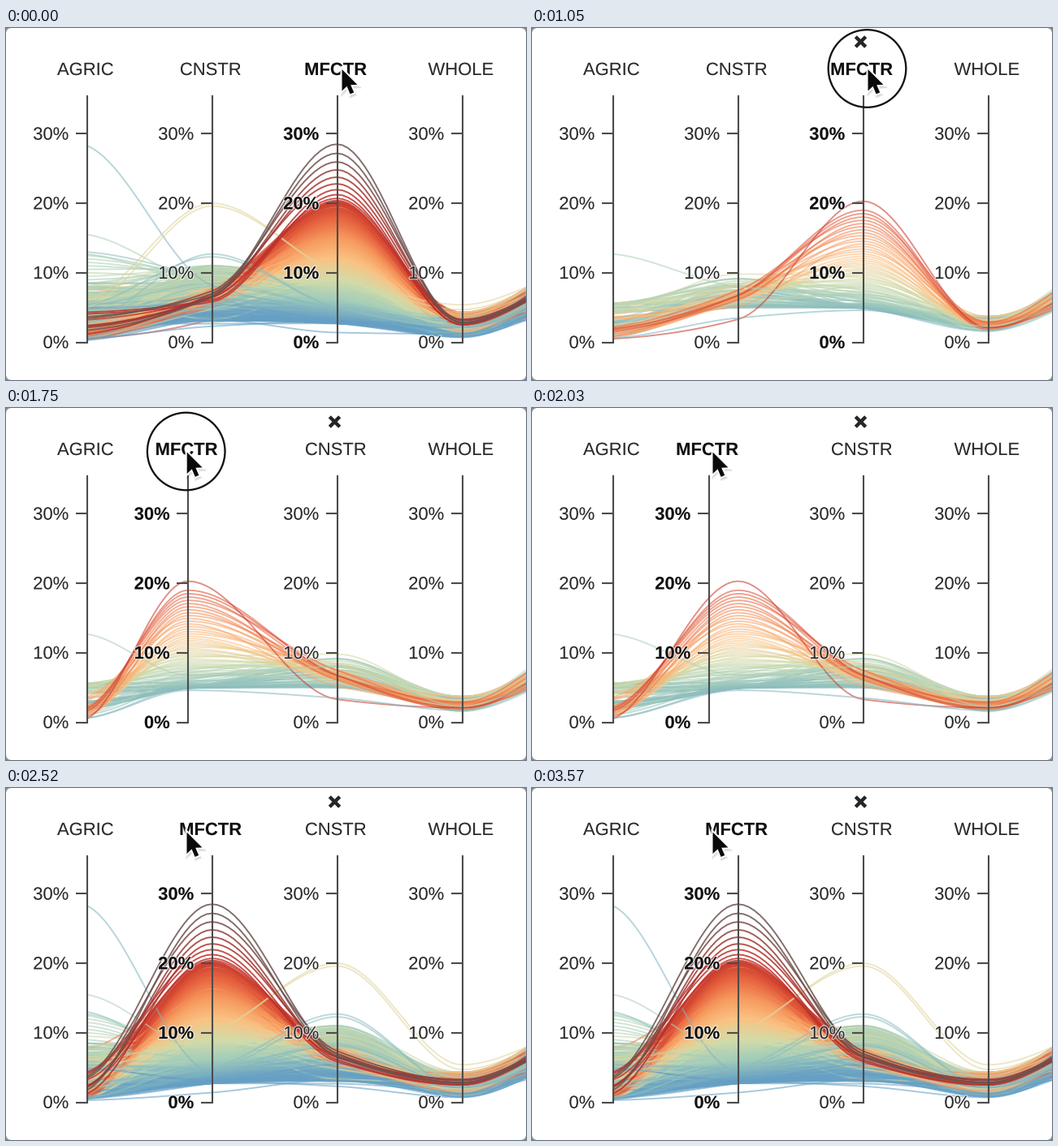
Animation of 640 by 434 pixels, one loop 3640 ms. Source, as a matplotlib script:

```python
import numpy as np
import matplotlib.pyplot as plt
from matplotlib.animation import FuncAnimation
from matplotlib.collections import LineCollection
from matplotlib.colors import LinearSegmentedColormap
from matplotlib.patches import Circle, FancyBboxPatch, Polygon
from matplotlib.patheffects import withStroke

W, H, DPI = 640, 434, 100
PX = 72 / DPI
FRAMES, STEP = 52, 70
SLOTS = 99.5 + 154 * np.arange(5)   # the last axis lies off stage
ZERO, UNIT = 387.5, 8.57            # y of 0 %, pixels per percent
HOVER, PRESS, DRAG, DROP = 3, 14, 15, 29

plt.rcParams["font.family"] = "Liberation Sans"
rng = np.random.default_rng(12)

# evenly spaced from 3 % to 27 %
CMAP = LinearSegmentedColormap.from_list("heat", [
    "#659fc5", "#a2cdbb", "#d3dca9", "#fac384", "#f79c60",
    "#e7633f", "#c23029", "#a03530", "#6b5450"])


def smooth(k, start, end):
    u = np.clip((k - start) / (end - start), 0, 1)
    return u * u * (3 - 2 * u)


def cubic(u):
    u = np.clip(u, 0, 1)
    return 4 * u ** 3 if u < 0.5 else 1 - (2 - 2 * u) ** 3 / 2


# ---- data: columns are AGRIC, CNSTR, MFCTR, WHOLE and the axis off stage
def rows(*cols):
    return np.column_stack(np.broadcast_arrays(*map(np.atleast_1d, cols)))


def sample(mf, ag_max, cn_span, wh_span):
    """Rows that suit the given MFCTR values: green ones spread the widest."""
    n = len(mf)
    green = np.exp(-((mf - 7.5) / 2.8) ** 2)
    blue = np.clip((6 - mf) / 3, 0, 1)
    ag = (0.3 + (1.8 + 6.5 * green) * rng.beta(1.3, 1.6, n)
          + rng.exponential(0.9, n))
    cn = 6.5 + 1.2 * green - 2.2 * blue + (0.7 + 1.1 * green) * rng.normal(0, 1, n)
    wh = 2.8 - 0.9 * blue + rng.normal(0, 0.6, n)
    nx = 9.8 - 1.8 * blue + rng.normal(0, 1.3, n)
    return rows(np.clip(ag, 0.2, ag_max), np.clip(cn, *cn_span), mf,
                np.clip(wh, *wh_span), nx)


few = np.vstack([
    sample(4.9 + 14.1 * np.linspace(0, 1, 85) ** 3, 5.6, (5, 9.8), (1.6, 3.7)),
    rows(0.5, 3.3, 20.3, 2.1, 9.5),
    rows(12.7, 8.0, 6.8, 2.3, 9.0),
    rows(0.6, 3.5, 4.6, 1.7, 8.0)])
fan = rows(np.linspace(8.5, 13, 10), rng.uniform(8.5, 10.8, 10),
           rng.uniform(5, 8.5, 10), 2.3, 9)
bulk = sample(2.7 + 17.5 * rng.random(900) ** 1.4, 8.5, (2.6, 11), (0.8, 4.3))
extra = np.vstack([
    rows([15.5, 28.3], 8.2, [7, 4.5], 2.4, 9),
    rows([6, 5], [20, 19.6], 10, [5.4, 4.7], 11),
    rows([3, 5.4], [12.7, 12.3], 5, 2.2, 8.5),
    rows([0.3, 0.6], [3.2, 2.3], [1.4, 3], [1.2, 0.7], 7),
    rows(rng.uniform(0.6, 4.5, 10), rng.uniform(5.8, 7.6, 10),
         20.4 + 8.1 * np.linspace(0, 1, 10) ** 1.5,
         rng.uniform(2.5, 3.4, 10), rng.uniform(9, 11.5, 10))])

DATA = np.vstack([few, fan, bulk, extra])
COLORS = CMAP(np.clip((DATA[:, 2] - 3) / 24, 0, 1))
COLORS[:, 3] = np.where(DATA[:, 2] > 20.3, 0.85, 0.58)
RANK = np.r_[np.zeros(len(few)), np.full(len(fan), 0.3),
             rng.uniform(0.05, 1, len(bulk)), np.full(len(extra), 0.3)]

T = np.linspace(0, 1, 24)
H00, H10 = 2 * T**3 - 3 * T**2 + 1, T**3 - 2 * T**2 + T
H01, H11 = 3 * T**2 - 2 * T**3, T**3 - T**2


def curves(xs, vals):
    """Smooth monotone curves through every row of vals at the places xs."""
    y = ZERO - UNIT * vals
    dx = np.diff(xs)
    s = np.diff(y) / dx
    a, b = s[:, :-1], s[:, 1:]
    same = a * b > 0
    mid = np.where(same, 2 * a * b / np.where(same, a + b, 1), 0)
    m = np.c_[0.35 * s[:, 0], mid, 0.5 * s[:, -1]]
    parts = []
    for i, d in enumerate(dx):
        parts.append(np.outer(y[:, i], H00) + np.outer(y[:, i + 1], H01)
                     + d * (np.outer(m[:, i], H10) + np.outer(m[:, i + 1], H11)))
    py = np.hstack(parts)
    px = np.concatenate([x + d * T for x, d in zip(xs, dx)])
    return np.stack([np.broadcast_to(px, py.shape), py], axis=-1)


# ---- stage
fig = plt.figure(figsize=(W / DPI, H / DPI), dpi=DPI, facecolor="#8c8c8c")
ax = fig.add_axes([0, 0, 1, 1])
ax.set_xlim(0, W)
ax.set_ylim(H, 0)
ax.axis("off")
ax.add_patch(FancyBboxPatch((0, 0), W, H, fc="white", ec="none", zorder=0,
                            boxstyle="round,pad=0,rounding_size=7"))

lines = LineCollection([], linewidths=1.9 * PX, zorder=1)
ax.add_collection(lines)


class Axis:
    def __init__(self, name, x, bold=False):
        style = dict(fontsize=22 * PX, weight="bold" if bold else "normal",
                     color="#111111" if bold else "#2b2b2b", zorder=4,
                     path_effects=[withStroke(linewidth=2.4 * PX,
                                              foreground=(1, 1, 1, 0.65))])
        self.title = ax.text(0, 58, name, ha="center", **style)
        self.labels = []
        self.dx, ys = [0, 0], [83, ZERO + 1]
        for v in range(0, 40, 10):
            y = ZERO - UNIT * v
            self.labels.append(ax.text(0, y + 7.3, f"{v}%", ha="right", **style))
            self.dx += [np.nan, -14, 0]
            ys += [np.nan, y, y]
        self.rule, = ax.plot(self.dx, ys, color="#4c4c4c", lw=2.1 * PX, zorder=3,
                             solid_capstyle="butt")
        self.move(x)

    def move(self, x):
        self.rule.set_xdata(np.add(self.dx, x))
        self.title.set_x(x - 1.8)
        for label in self.labels:
            label.set_x(x - 22.3)


Axis("AGRIC", SLOTS[0])
Axis("WHOLE", SLOTS[3])
cnstr = Axis("CNSTR", SLOTS[1])
mfctr = Axis("MFCTR", SLOTS[2], bold=True)

ARM = np.array([-6.2, 6.2])
cross = [ax.plot(404.5 + ARM, 17 + side * ARM, color="#262626", lw=4.4 * PX,
                 solid_capstyle="butt", zorder=5)[0] for side in (1, -1)]
ring = Circle((0, 0), 47.8, fill=False, ec="#111111", lw=2.3 * PX, zorder=6)
ax.add_patch(ring)

ARROW = 1.6 * np.array([(0, 0), (0, 16.6), (3.8, 13), (6.3, 19), (9.2, 17.8),
                        (6.7, 12), (11.8, 11.8)])
shadow = Polygon(ARROW, fc="black", ec="black", lw=4 * PX, alpha=0.12, zorder=7)
rim = Polygon(ARROW, fc="white", ec="white", lw=4 * PX, zorder=8)
arrow = Polygon(ARROW, fc="#0a0a0a", ec="none", zorder=9)
for patch in (shadow, rim, arrow):
    ax.add_patch(patch)


def draw(k):
    # pointer
    s = smooth(k, DRAG, 25.2)
    hot = np.array([412.5 - 191 * s, 50 + 3.5 * s])
    tip = hot + [1, 1]
    shadow.set_xy(ARROW + tip + [1, 2.5])
    rim.set_xy(ARROW + tip)
    arrow.set_xy(ARROW + tip)
    ring.center = tuple(hot)
    ring.set_visible(PRESS <= k < DROP)
    for arm in cross:
        arm.set_visible(k >= HOVER)

    # dragged axis, which settles into its new slot once dropped
    held = SLOTS[2] - 190 * smooth(k, 18.08, 25.86)
    x_m = held if k < DROP else held + (SLOTS[1] - held) * cubic((k - DROP) / 7)
    swapped = held < SLOTS[1]
    x_c = SLOTS[2] if swapped else SLOTS[1]
    mfctr.move(x_m)
    cnstr.move(x_c)

    # curves jump to the slot at once and refill step by step
    x_line = held if k < DROP else SLOTS[1]
    inner = [x_line, x_c] if swapped else [x_c, x_line]
    cols = [0, 2, 1, 3, 4] if swapped else [0, 1, 2, 3, 4]
    share = 1 if k < DRAG else np.clip((k - DROP) / 8, 0.01, 1)
    shown = RANK <= share
    xs = np.array([SLOTS[0], *inner, *SLOTS[3:]])
    lines.set_segments(curves(xs, DATA[shown][:, cols]))
    lines.set_color(COLORS[shown])
    return lines,


anim = FuncAnimation(fig, draw, frames=FRAMES, interval=STEP, repeat=True,
                     repeat_delay=0, blit=False)
plt.show()
```
